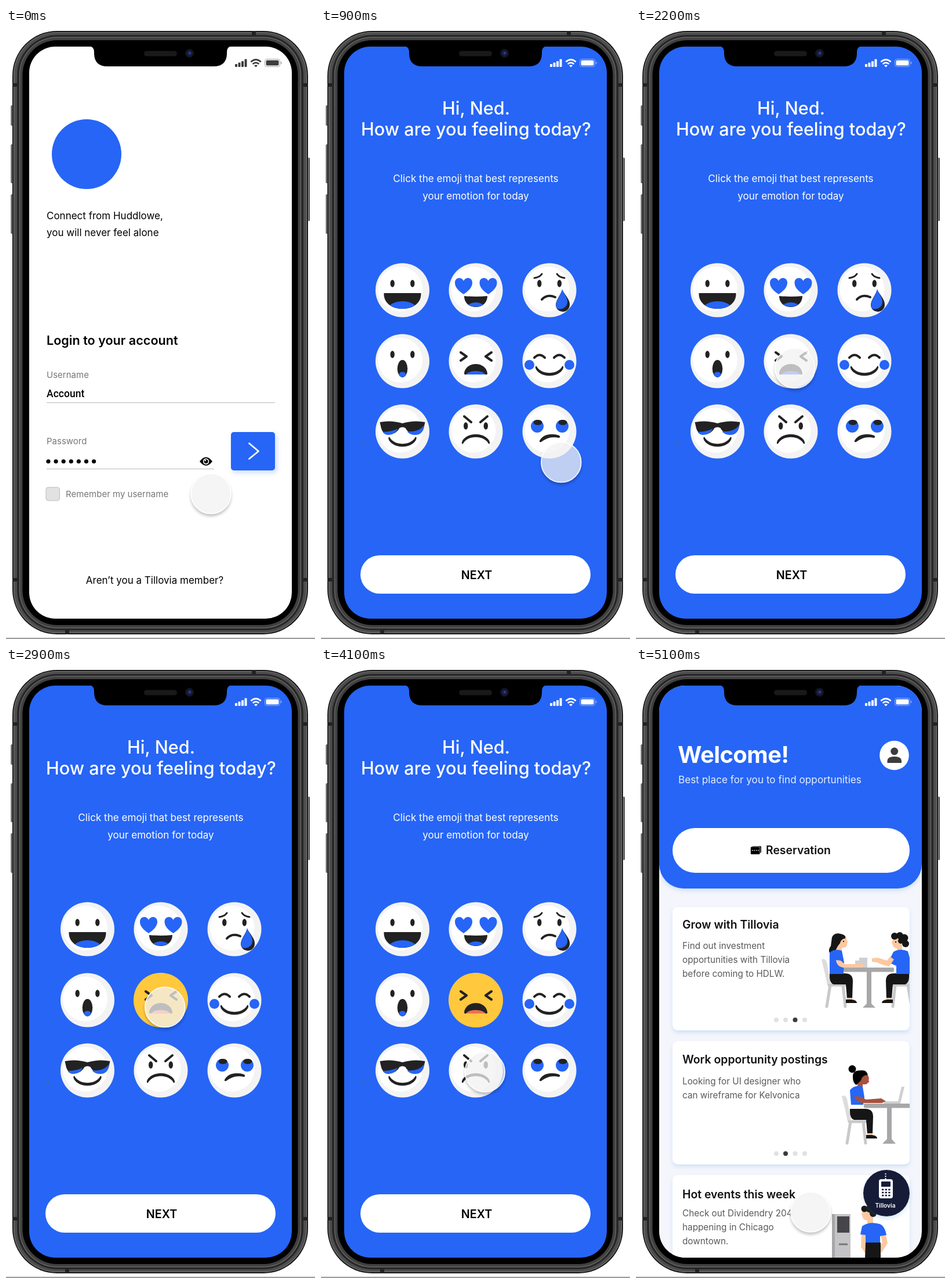
An HTML page for the animation above (5200 ms loop, 533 by 1051 pixels).

```html
<!DOCTYPE html>
<html lang="en">
<head>
<meta charset="utf-8">
<title>Check-in app</title>
<style>
html, body { margin: 0; width: 100%; height: 100%; overflow: hidden; background: #fff; }
svg { display: block; width: 100%; height: 100%; font-family: Inter, "Open Sans", sans-serif; }
.mid { text-anchor: middle; }
.blue { fill: #2665f6; }
.dark { fill: #222; }
.line { fill: none; stroke: #222; stroke-width: 4; stroke-linecap: round; stroke-linejoin: round; }
.white { fill: #fff; }
.hint { font-size: 15px; fill: #777; }
.body { font-size: 17px; }
.head { font-size: 30.6px; font-weight: 500; }
.title { font-size: 19.4px; font-weight: 600; fill: #111; }
.note { font-size: 15.3px; fill: #595959; }
.skin { fill: #fcc8a0; }
.chair { fill: none; stroke: #c9c9cb; stroke-width: 5; stroke-linecap: round; stroke-linejoin: round; }
.steel { fill: #a7a7a9; }
.off { fill: #e1e1e1; }
</style>
</head>
<body>
<svg viewBox="0 0 533 1051" preserveAspectRatio="none">
<defs>
  <clipPath id="glass"><rect x="40" y="32" width="453" height="984" rx="45"/></clipPath>
  <clipPath id="card"><rect x="63" y="413" width="409" height="700"/></clipPath>
  <linearGradient id="side">
    <stop offset="0" stop-color="#222"/><stop offset=".5" stop-color="#999"/><stop offset="1" stop-color="#222"/>
  </linearGradient>
  <filter id="soft" x="-30%" y="-30%" width="160%" height="160%">
    <feDropShadow dx="0" dy="4" stdDeviation="3" flood-color="#4a90c8" flood-opacity=".2"/>
  </filter>
  <filter id="glow" x="-30%" y="-30%" width="160%" height="160%">
    <feDropShadow dx="3" dy="4" stdDeviation="4" flood-color="#2665f6" flood-opacity=".22"/>
  </filter>
  <filter id="blur" x="-30%" y="-30%" width="160%" height="160%"><feGaussianBlur stdDeviation="2.5"/></filter>
  <mask id="ring" maskUnits="userSpaceOnUse" x="-50" y="-50" width="100" height="105">
    <rect x="-50" y="-50" width="100" height="105" fill="#fff"/><circle r="35" fill="#000"/>
  </mask>
  <g id="disc"><circle r="46.5" fill="#f3f3f3"/><circle cx="-4" cy="-2" r="38.5" fill="#fff"/></g>
  <g id="eyes" class="dark"><ellipse cx="-17.3" cy="-11.5" rx="3.7" ry="6.2"/><ellipse cx="17.3" cy="-11.5" rx="3.7" ry="6.2"/></g>
  <path id="heart" class="blue" d="M0 15C-9 9 -15 3 -15 -5C-15 -14 -4 -16 0 -8C4 -16 15 -14 15 -5C15 3 9 9 0 15Z"/>
  <path id="smile" class="dark" d="M-22 10C-14 25 14 25 22 10C25 8 25 14 21 18C11 29 -11 29 -21 18C-25 14 -25 8 -22 10Z"/>
  <g id="status" fill="currentColor">
    <rect x="395" y="62" width="4" height="5" rx="1"/><rect x="400.5" y="59.5" width="4" height="7.5" rx="1"/>
    <rect x="406" y="57" width="4" height="10" rx="1"/><rect x="411.5" y="53.5" width="4" height="13.5" rx="1"/>
    <g fill="none" stroke="currentColor" stroke-width="2.6"><path d="M422.3 58.3Q431 50.5 439.7 58.3"/><path d="M425.6 61.9Q431 57.3 436.4 61.9"/></g>
    <path d="M428 64.6Q431 62.4 434 64.6L431 67.6Z"/>
    <rect x="446.5" y="53.5" width="26" height="13" rx="3.5" fill="none" stroke="currentColor" opacity=".45"/>
    <rect x="448.5" y="55.5" width="22" height="9" rx="2"/><rect x="474" y="58" width="1.5" height="4" rx=".7" opacity=".5"/>
  </g>
  <g id="seat">
    <path class="chair" d="M324 505L333 547H361M335 547L329 584M357 547L361 584"/>
    <path d="M320 503Q327 501 329 508L336 545H331Q325 525 320 503Z" fill="#dcdcde"/>
  </g>
  <g id="legs"><path d="M334 527H360Q374 527 374 540L373 571H364L362 546H341Q333 544 334 527Z" fill="#161616"/>
    <rect x="364" y="569" width="9" height="4" class="skin"/><path d="M362 572H372Q381 573 381 578H362Z" fill="#161616"/></g>
</defs>

<!-- phone body -->
<rect y="1049" width="533" height="1.6" fill="#808080"/>
<g fill="url(#side)">
  <rect x="8.5" y="133" width="5" height="35" rx="1.5"/><rect x="8.5" y="200" width="5" height="67" rx="1.5"/>
  <rect x="8.5" y="286" width="5" height="68" rx="1.5"/><rect x="518.5" y="223" width="5.5" height="109" rx="1.5"/>
</g>
<rect x="11" y="5" width="510" height="1038" rx="77" fill="#141414"/>
<rect x="13.5" y="7.5" width="505" height="1033" rx="74.5" fill="#4c4d4c" stroke="#777" stroke-width="1.2"/>
<rect x="19" y="12" width="494" height="1024" rx="70" fill="#252625"/>
<rect x="23.5" y="16" width="485" height="1016" rx="65" fill="#3f403f" stroke="#646564" stroke-width="1.5"/>
<rect x="28.5" y="21" width="475" height="1006" rx="60" fill="#000"/>
<g fill="#222"><rect x="424" y="5" width="7" height="7"/><rect x="102" y="1036" width="7" height="7"/>
  <path d="M11 95h8v6h-8zM513 95h8v6h-8zM11 946h8v6h-8zM513 946h8v6h-8z"/></g>

<g clip-path="url(#glass)">
  <!-- login -->
  <g id="login">
    <rect x="40" y="32" width="453" height="984" fill="#fff"/>
    <use href="#status" color="#3d3d3d"/>
    <circle class="blue" cx="139" cy="217" r="60"/>
    <g class="body" font-size="16.8"><text x="70" y="328.5">Connect from Huddlowe,</text><text x="70" y="358">you will never feel alone</text></g>
    <text x="70" y="545" font-size="21.6" font-weight="600">Login to your account</text>
    <text class="hint" x="70" y="602">Username</text>
    <text x="70" y="635" font-family="Roboto, sans-serif" font-size="17.5" font-weight="500">Account</text>
    <path d="M70 644.5H464M70 758.5H359" stroke="#b9b9b9"/>
    <text class="hint" x="70" y="716">Password</text>
    <path d="M73 745.5H153" stroke="#000" stroke-width="7.2" stroke-linecap="round" stroke-dasharray="0 13.1"/>
    <path d="M334 745.5Q345 731 356 745.5Q345 760 334 745.5Z"/>
    <circle class="white" cx="345" cy="745.5" r="5.2"/><circle cx="345" cy="745.5" r="3.6"/><circle class="white" cx="343.8" cy="744" r="1.2"/>
    <rect class="blue" x="388" y="695" width="76" height="66" rx="5" filter="url(#glow)"/>
    <path d="M419.5 714.5L435.5 728L419.5 741" fill="none" stroke="#fff" stroke-width="2.8" stroke-linecap="round" stroke-linejoin="round"/>
    <rect x="69" y="790" width="23.5" height="23" rx="4" fill="#e2e2e2" stroke="#bbb"/>
    <text class="hint" x="103" y="806.5">Remember my username</text>
    <text class="body mid" x="256.5" y="956">Aren’t you a Tillovia member?</text>
  </g>

  <!-- mood picker -->
  <g id="mood">
    <rect class="blue" x="40" y="32" width="453" height="984"/>
    <use href="#status" color="#fff"/>
    <g class="white mid">
      <text class="head" x="267.5" y="149">Hi, Ned.</text>
      <text class="head" x="267.5" y="185">How are you feeling today?</text>
      <g font-size="17.1"><text x="267" y="265">Click the emoji that best represents</text><text x="267" y="294.5">your emotion for today</text></g>
    </g>
    <ellipse cx="72" cy="714" rx="3" ry="2" fill="#4564ac"/>

    <g transform="translate(140.5 451)"><use href="#disc"/><use href="#eyes"/>
      <path class="dark" d="M-32 5H32C33 22 18 32 0 32S-33 22 -32 5Z"/>
      <path class="blue" d="M-22 26Q-13 19 0 19T22 26Q13 32 0 32T-22 26Z"/></g>

    <g transform="translate(267 451)"><use href="#disc"/>
      <use href="#heart" x="-21" y="-8"/><use href="#heart" x="21.5" y="-8"/>
      <path class="dark" d="M-20 10Q0 12 20 10C20 22 11 29 0 29S-20 22 -20 10Z"/>
      <path class="blue" d="M-13 25Q0 17 13 25Q0 32 -13 25Z"/></g>

    <g transform="translate(394 451)"><use href="#disc"/><use href="#eyes"/>
      <path class="line" stroke-width="3" d="M-26 -21Q-17 -22 -13 -28M26 -21Q17 -22 13 -28" style="stroke-width:3"/>
      <path class="line" d="M-13 16Q-4 6 10 12"/>
      <path class="dark" d="M22 0C29 10 35 17 35 24A12 12 0 0 1 11 26C11 17 18 10 22 0Z"/>
      <path class="blue" d="M22 -2C26 8 31 13 31 20C31 28 24 34 14 32C6 22 19 12 22 -2Z"/></g>

    <g transform="translate(140.5 573)"><use href="#disc"/><use href="#eyes"/>
      <ellipse class="dark" cy="13" rx="8.8" ry="15"/><ellipse class="blue" cy="23" rx="6" ry="4.5"/></g>

    <g transform="translate(267 573)"><use href="#disc"/>
      <circle id="picked" r="47" fill="#ffc83d"/>
      <path class="line" d="M-26 -15L-16 -8L-26 -1M27 -15L17 -8L27 -1"/>
      <path class="dark" d="M-20 21C-19 11 -10 5 0 5S19 11 20 21Q20 24 17 23H-17Q-20 24 -20 21Z"/>
      <path id="tongue" d="M-17 23Q-12 17 0 17T17 23Z"/></g>

    <g transform="translate(394 573)"><use href="#disc"/>
      <circle class="blue" cx="-34.5" cy="6.5" r="8.5"/><circle class="blue" cx="34.5" cy="6.5" r="8.5"/>
      <path class="line" d="M-26 -6Q-17 -15 -8 -6M8 -6Q17 -15 26 -6"/>
      <use href="#smile" y="-1"/></g>

    <g transform="translate(140.5 694)"><use href="#disc"/>
      <path class="dark" d="M-39 -16Q-20 -20 0 -14Q20 -20 39 -16L37 -7Q34 6 22 5Q10 4 5 -6Q0 -9 -5 -6Q-10 4 -22 5Q-34 6 -37 -7Z"/>
      <path class="blue" d="M-34 1Q-16 0 -8 -5Q-13 6 -24 6Q-31 6 -34 1ZM8 0Q30 1 37 -11Q36 6 22 6Q13 6 8 0Z"/>
      <use href="#smile"/></g>

    <g transform="translate(267 694)"><use href="#disc"/><use href="#eyes" y="2"/>
      <path class="line" d="M-20 -26L-8 -16M20 -26L8 -16"/>
      <use href="#smile" transform="translate(0 31) scale(1 -1)"/></g>

    <g transform="translate(394 694)"><use href="#disc"/>
      <circle class="blue" cx="-21" cy="-9" r="11"/><circle class="blue" cx="22" cy="-9" r="11"/>
      <ellipse class="dark" cx="-20" cy="-15.5" rx="7.5" ry="4.5"/><ellipse class="dark" cx="23" cy="-15.5" rx="7.5" ry="4.5"/>
      <path class="dark" d="M-17 16C-12 5 4 2 17 7Q20 10 16 11C4 8 -6 12 -14 18Q-18 19 -17 16Z"/></g>

    <rect class="white" x="68" y="907" width="397" height="66" rx="33"/>
    <text class="mid" x="268.5" y="947.5" font-size="19.8" font-weight="600">NEXT</text>
  </g>

  <!-- home -->
  <g id="home">
    <rect x="40" y="32" width="453" height="984" fill="#f5f5fd"/>
    <rect class="blue" x="40" y="-20" width="453" height="401" rx="42" filter="url(#soft)"/>
    <use href="#status" color="#fff"/>
    <text class="white" x="72" y="165" font-size="40" font-weight="700" letter-spacing="-.6">Welcome!</text>
    <text x="73" y="200" font-size="17.2" fill="#e6edff">Best place for you to find opportunities</text>
    <circle class="white" cx="445.5" cy="152" r="25.3"/>
    <g fill="#3d3d3d"><circle cx="445.7" cy="145" r="6.5"/><path d="M433.5 165V161Q434 154 445.7 154T458 161V165Z"/></g>
    <rect class="white" x="63" y="277" width="409" height="77" rx="38.5"/>
    <rect x="200" y="308" width="16" height="12" rx="2"/><rect x="197.5" y="309" width="16.5" height="13.5" rx="2" stroke="#fff" stroke-width=".7"/>
    <path d="M200 315.5H212" stroke="#fff" stroke-width="1.4" stroke-dasharray="1.6 1.8"/>
    <text class="title" x="224" y="322">Reservation</text>

    <g class="white" filter="url(#soft)"><rect x="63" y="413" width="409" height="212" rx="9"/><rect x="63" y="643.5" width="409" height="212" rx="9"/><rect x="63" y="874" width="409" height="212" rx="9"/></g>
    <g class="title"><text x="80" y="450">Grow with Tillovia</text><text x="80" y="682">Work opportunity postings</text><text x="80" y="913.5">Hot events this week</text></g>
    <g class="note">
      <text x="80" y="484.5">Find out investment</text><text x="80" y="508.5">opportunities with Tillovia</text><text x="80" y="532.5">before coming to HDLW.</text>
      <text x="80" y="718">Looking for UI designer who</text><text x="80" y="742">can wireframe for Kelvonica</text>
      <text x="80" y="944.5">Check out Dividendry 204</text><text x="80" y="968.5">happening in Chicago</text><text x="80" y="992.5">downtown.</text>
    </g>
    <g id="dots"></g>

    <g clip-path="url(#card)">
      <!-- two people at a table -->
      <use href="#seat"/><use href="#legs"/>
      <use href="#seat" transform="translate(804 0) scale(-1 1)"/><use href="#legs" transform="translate(805 0) scale(-1 1)"/>
      <path class="steel" d="M398 522H406V579L413 586H391L398 579Z"/>
      <rect class="steel" x="358" y="517" width="87" height="7.5" rx="2"/>
      <path d="M385 500H399V517H378V505H385Z" fill="#cfcfd1"/>
      <path class="skin" d="M345 477H355V492H345ZM350 463H362L365 473L363 481Q358 485 350 481Z"/>
      <path d="M338 465Q342 456 353 459Q363 461 361 467Q354 467 352 475Q346 482 344 489Q340 496 334 492Q331 486 336 480Z" fill="#161616"/>
      <path class="blue" d="M334 491Q343 484 355 488L359 508L358 528H334Z"/>
      <path class="skin" d="M345 504L353 505L360 511L390 511Q396 514 392 517H357Q346 515 345 504Z"/>
      <path class="skin" d="M450 477H459V492H450ZM445 464H458V483Q448 486 444 481L441 474Z"/>
      <g fill="#161616"><circle cx="446" cy="463" r="6"/><circle cx="455" cy="462" r="6"/><circle cx="463" cy="466" r="6.5"/><circle cx="465" cy="476" r="6"/><circle cx="457" cy="471" r="5"/></g>
      <path class="blue" d="M444 490Q456 483 469 489L472 500V528H449V514L435 508Z"/>
      <path class="skin" d="M445 503L437 515Q424 513 416 508L407 507V501L417 500L433 505L438 498Z"/>
      <path d="M357 471h2v2h-2zM447 472h2v2h-2z" fill="#222"/>

      <!-- worker with laptop -->
      <use href="#seat" transform="translate(35 235)"/><use href="#legs" transform="translate(35 233)"/>
      <path class="steel" d="M433 756H441V812L448 820H425L433 812Z"/>
      <rect class="steel" x="393" y="751" width="80" height="7.5" rx="2"/>
      <path d="M428 747H452L458 722H463L456 751H428Z" fill="#d0d0d2"/>
      <path d="M382 708H391V726H382ZM386 698H399L402 708L399 717Q391 720 384 714Z" fill="#a5523f"/>
      <circle cx="373" cy="691.5" r="6.5"/><path d="M374 706Q373 694 386 694Q399 692 399 702Q390 702 388 711L380 719Q374 715 374 706Z"/>
      <circle cx="400" cy="713" r="2" fill="#d9333f"/>
      <path class="blue" d="M369 728Q377 718 391 722L394 740L392 753H371Z"/>
      <path d="M377 738L386 739L397 744L423 742L431 747L424 750H391Q378 748 377 738Z" fill="#a5523f"/>

      <!-- visitor at a kiosk -->
      <path d="M338 941H370V1017H338Z" fill="#c4c4c6"/><path d="M338 941H343V1017H338Z" fill="#a7a7a9"/>
      <rect x="347" y="945" width="21" height="28" fill="#45454a"/><path d="M350 993H365" stroke="#777" stroke-width="3"/>
      <path class="skin" d="M399 944H409V961H399ZM392 932H407V950Q396 954 392 949L389 941Z"/>
      <g fill="#161616"><circle cx="394" cy="932" r="5.5"/><circle cx="403" cy="932" r="6.5"/><circle cx="409" cy="940" r="6"/></g>
      <path class="skin" d="M389 972H397V996L402 1004L396 1009L388 998ZM421 972H430L434 991L424 1007L416 1002L425 990Z"/>
      <path class="blue" d="M390 962Q402 953 420 958Q429 961 432 977L421 979V992H396V977L387 976Z"/>
      <path d="M396 990H422V1017H395Z" fill="#161616"/>
    </g>

    <g filter="url(#soft)"><circle cx="432" cy="905" r="40" fill="#141d38"/></g>
    <path d="M430.5 871V881" stroke="#fff" stroke-width="2" stroke-dasharray="2 2"/>
    <rect class="white" x="419" y="881" width="24" height="33" rx="4"/><rect x="423" y="885" width="16" height="9" rx="1" fill="#141d38"/>
    <path d="M424 899H439M424 904H439M424 909H439" stroke="#141d38" stroke-width="2.6" stroke-dasharray="3.4 2.2"/>
    <text class="white mid" x="430" y="929.5" font-size="10.2" font-weight="600">Tillovia</text>
  </g>
</g>

<!-- notch -->
<path d="M143 31Q152 32 152 41V45Q153 66 175 66H358Q380 66 381 45V41Q381 32 390 31Z"/>
<rect x="238" y="39.5" width="57" height="9" rx="4.5" fill="#191919"/>
<circle cx="316.5" cy="43.5" r="7.5" fill="#15161d"/><circle cx="316.5" cy="43.5" r="4.2" fill="#17205a"/><circle cx="317" cy="43" r="2" fill="#2c3f9c"/>

<g id="pointer">
  <circle cy="4" r="35" fill="#000" opacity=".24" filter="url(#blur)" mask="url(#ring)"/>
  <circle r="34.2" fill="#f2f2f2" fill-opacity=".75"/>
  <circle r="34.4" fill="none" stroke="#fff" stroke-width="1.8" stroke-opacity=".9"/>
</g>
</svg>
<script>
const $ = id => document.getElementById(id);
const LOOP = 5200, STEP = 100;
const CUT = { mood: 900, pick: 2700, home: 5000 };
// [start, end, x, y]: the pointer glides to x,y between start and end
const START = [353.5, 801];
const MOVES = [
  [0, 600, 414.3, 747],
  [1300, 2000, 274.2, 585],
  [3800, 4600, 301.2, 937.5]
];

const pager = (y, active) => [242, 258, 274.5, 291].map((x, i) =>
  `<circle cx="${x}" cy="${y}" r="4" fill="${i === active ? '#3b3b3b' : '#e1e1e1'}"/>`).join('');
$('dots').innerHTML = pager(607, 2) + pager(837, 1);

const ease = p => p * p * (3 - 2 * p);
const show = (id, on) => { $(id).style.display = on ? '' : 'none'; };

function pointerAt(t) {
  let [x, y] = START;
  for (const [a, b, tx, ty] of MOVES) {
    const k = ease(Math.min(1, Math.max(0, (t - a) / (b - a))));
    x += (tx - x) * k;
    y += (ty - y) * k;
  }
  return [x, y];
}

function draw(now) {
  const t = Math.floor((now % LOOP) / STEP) * STEP;
  show('login', t < CUT.mood);
  show('mood', t >= CUT.mood && t < CUT.home);
  show('home', t >= CUT.home);
  show('picked', t >= CUT.pick);
  $('tongue').setAttribute('fill', t >= CUT.pick ? '#f0704f' : '#2665f6');
  $('pointer').setAttribute('transform', `translate(${pointerAt(t)})`);
}

const t0 = performance.now();
function tick() {
  draw(performance.now() - t0);
  requestAnimationFrame(tick);
}
tick();
</script>
</body>
</html>
```
